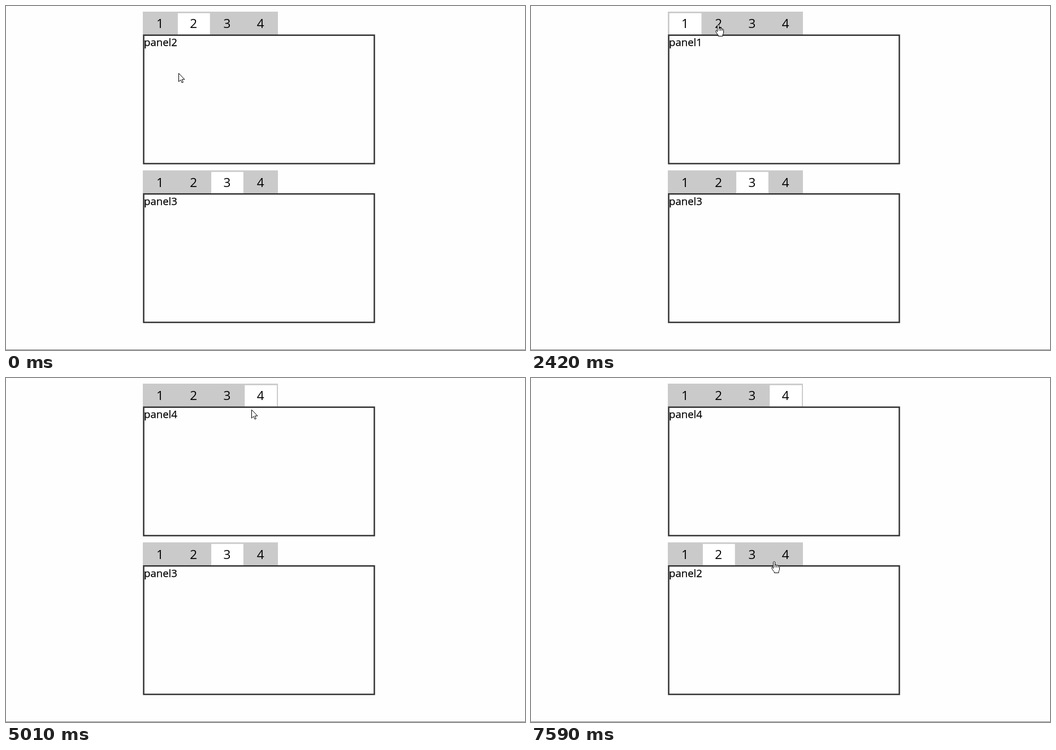
Write an HTML page that moves like this. It is 918x610 px and loops after 8000 ms.

```html
<!DOCTYPE html>
<html lang="en">
<head>
<meta charset="utf-8">
<title>Tabs</title>
<style>
  html, body { margin: 0; width: 100%; height: 100%; overflow: hidden; background: #fefefe; }
  svg { display: block; }
  text { font-family: "Open Sans", "Noto Sans", sans-serif; }
  .tab { font-size: 22.5px; text-anchor: middle; }
  .label { font-size: 18.6px; stroke: #000; stroke-width: .25; }
  .cursor { fill: #fff; stroke: #000; stroke-linejoin: round; stroke-linecap: round; }
</style>
</head>
<body>
<svg width="918" height="610" viewBox="0 0 918 610">
  <g id="widgets"></g>
  <rect y="609" width="918" height="1" fill="#8c8c8c"/>
  <g id="cursor" class="cursor">
    <path id="arrow" d="M.5 .7V15.2L3.9 12L6.2 17.1L8.4 16.1L6.2 11.2H10.5Z"/>
    <g id="hand">
      <path d="M-1.3 12.2V2C-1.3 0 1.7 0 1.7 2V7C2 5.7 4.4 5.8 4.5 7.4C5 6.3 7.1 6.6 7.2 8.2C7.8 7.4 9.6 7.8 9.6 9.4V14C9.6 16 8 17.2 8 19V20.5H.3V18.8C-1.2 17.5-2.6 14.8-4.2 12.3C-5 10.7-3.2 9.7-2.2 10.9Z"/>
      <path d="M1.7 6.5V10.5M4.5 7.4V10.5M7.2 8.2V10.7" fill="none"/>
    </g>
  </g>
</svg>
<script>
const LOOP = 8000, STEP = 150;            // pointer is redrawn about every STEP ms
const LEFT = 242, TOP = 10, BAR_W = 239, BAR_H = 41;
const PITCH = 59.2, GAP = 281.5;          // distance between tabs, between widgets
const $ = id => document.getElementById(id);

// Each visit: pointer leaves, arrives, clicks, and where
const visits = [
  { go: 430, stop: 1120, click: 1630, x: 268, y: 42 },
  { go: 2150, stop: 2420, click: 2700, x: 331, y: 33 },
  { go: 3100, stop: 3400, click: 3800, x: 385, y: 32 },
  { go: 3970, stop: 4330, click: 4740, x: 446, y: 35 },
  { go: 5010, stop: 5720, click: 6150, x: 284, y: 319 },
  { go: 6430, stop: 6560, click: 6940, x: 324, y: 319 },
  { go: 7100, stop: 7590, click: LOOP, x: 430, y: 325 }
];

const widgetAt = y => y < TOP + GAP ? 0 : 1;
const tabAt = x => Math.floor((x - LEFT) / PITCH) + 1;

$('widgets').innerHTML = [0, 1].map(i => `
  <g transform="translate(0 ${i * GAP})">
    <rect x="${LEFT}" y="${TOP}" width="${BAR_W}" height="${BAR_H}" fill="#cacaca"/>
    <rect id="pick${i}" y="12.75" width="56.8" height="38" fill="#fff"/>
    <rect x="243.5" y="51.75" width="408" height="227.75" fill="#fefefe" stroke="#333" stroke-width="2.5"/>
    ${[0, 1, 2, 3].map(n =>
      `<text class="tab" x="${272.5 + PITCH * n}" y="39">${n + 1}</text>`).join('')}
    <text id="label${i}" class="label" x="244" y="71.2"></text>
  </g>`).join('');

function pointer(t) {
  let x = 305, y = 119;
  for (const v of visits) {
    if (t < v.go) break;
    const steps = Math.round((v.stop - v.go) / STEP);
    const done = Math.floor((t - v.go) / (v.stop - v.go) * steps + 1e-6) + 1;
    const p = Math.min(1, done / (steps + 1));
    const ease = p * p * (3 - 2 * p);
    x += (v.x - x) * ease;
    y += (v.y - y) * ease;
  }
  return [Math.round(x), Math.round(y)];
}

function draw(t) {
  const picked = [2, 3];
  for (const v of visits)
    if (t >= v.click) picked[widgetAt(v.y)] = tabAt(v.x);
  picked.forEach((n, i) => {
    $('pick' + i).setAttribute('x', 244.7 + PITCH * (n - 1));
    $('label' + i).textContent = 'panel' + n;
  });

  const [x, y] = pointer(t);
  const barY = y - TOP - GAP * widgetAt(y);
  const overTabs = x > LEFT && x < LEFT + BAR_W && barY >= 0 && barY < BAR_H;
  $('cursor').setAttribute('transform', `translate(${x} ${y})`);
  $('hand').style.display = overTabs ? '' : 'none';
  $('arrow').style.display = overTabs ? 'none' : '';
}

const begin = performance.now();
function frame() {
  draw((performance.now() - begin) % LOOP);
  requestAnimationFrame(frame);
}
frame();
</script>
</body>
</html>
```
